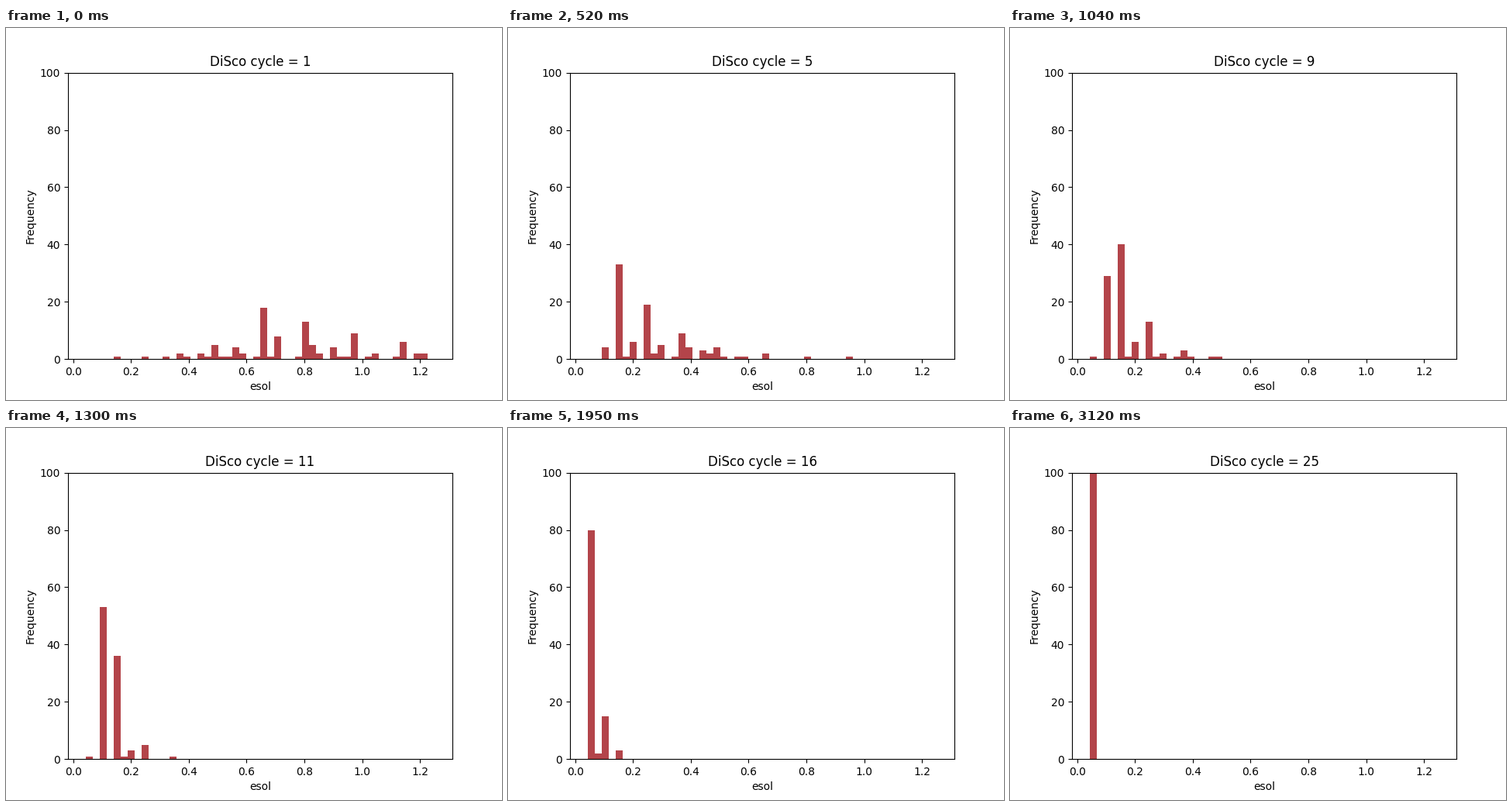
These frames come from a looping animation (640x480 px, 3.25 s). A matplotlib script:

```python
import numpy as np
import matplotlib.pyplot as plt
from matplotlib.animation import FuncAnimation

CYCLES = 25
BINS = 50
TOTAL = 100
LOW, HIGH = 0.04247, 1.25183
WIDTH = (HIGH - LOW) / BINS

# Key cycles of the drifting distribution: mode and its falloff on either side.
KEY_CYCLES = [1, 5, 9, 11, 16, 20]
MODE = [25, 4, 2.46, 2.27, 0, 0]
LEFT = [5.5, 0.9, 0.6, 0.5, 0.5, 0.5]
RIGHT = [18, 7, 3.5, 1.9, 1.2, 0.1]

# A few bins attract most of the population, the rest only a little.
bins = np.arange(BINS)
affinity = 0.5 * np.random.default_rng(4).random(BINS) ** 3
affinity[[0, 2, 4, 8, 13, 18, 25, 31, 38, 45]] = 1


def counts_at(cycle):
    """Whole counts per bin, always adding up to TOTAL."""
    mode, left, right = (np.interp(cycle, KEY_CYCLES, key)
                         for key in (MODE, LEFT, RIGHT))
    offset = bins - mode
    weight = affinity * np.exp(-np.abs(offset) / np.where(offset < 0, left, right))
    running = np.rint(TOTAL * np.cumsum(weight) / weight.sum())
    return np.diff(running, prepend=0)


fig, ax = plt.subplots(figsize=(6.4, 4.8), dpi=100)
bars = ax.bar(LOW + WIDTH * bins, counts_at(1), WIDTH,
              align="edge", color="#b3444a", linewidth=0)
margin = 0.05 * (HIGH - LOW)
ax.set_xlim(LOW - margin, HIGH + margin)
ax.set_ylim(0, TOTAL)
ax.set_xlabel("esol")
ax.set_ylabel("Frequency")
title = ax.set_title("DiSco cycle = 1")


def update(frame):
    cycle = frame + 1
    for bar, count in zip(bars, counts_at(cycle)):
        bar.set_height(count)
    title.set_text(f"DiSco cycle = {cycle}")
    return [*bars, title]


anim = FuncAnimation(fig, update, frames=CYCLES, interval=130, repeat=True)
plt.show()
```
